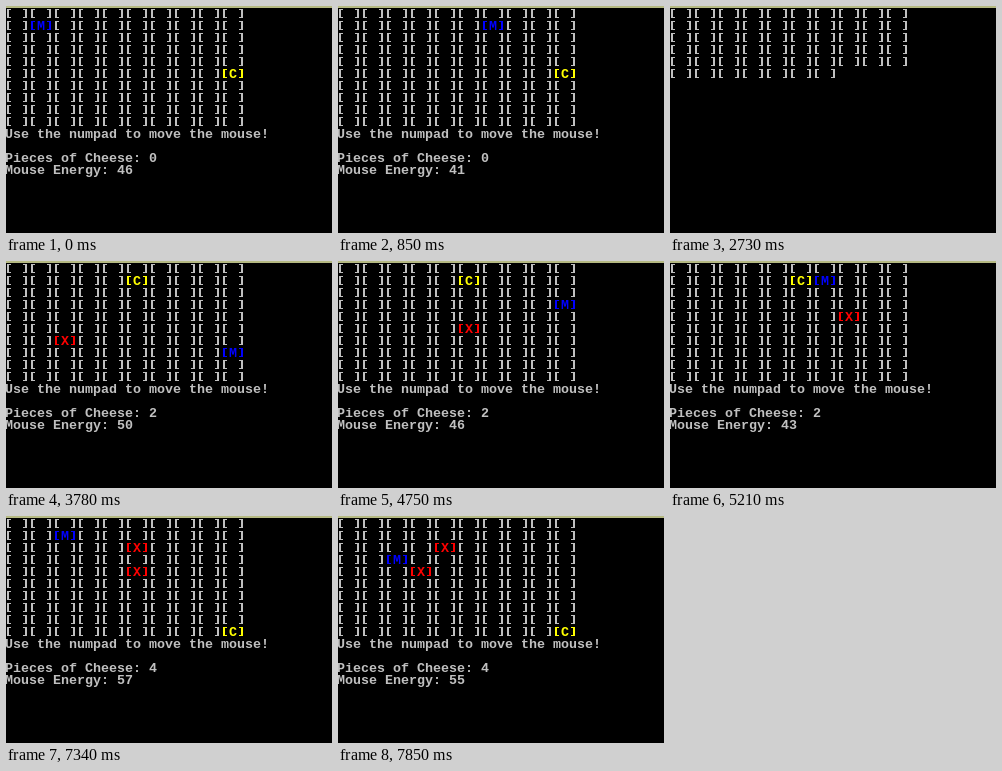
An HTML page with a canvas for the animation above (8 s loop, 326 by 227 pixels).

```html
<!DOCTYPE html>
<html lang="en">
<head>
<meta charset="utf-8">
<title>Mouse and cheese</title>
<style>
  html, body { margin: 0; width: 100%; height: 100%; overflow: hidden; background: #000; }
  canvas { display: block; width: 326px; height: 227px; }
</style>
</head>
<body>
<canvas id="stage" width="326" height="227"></canvas>
<script>
const ctx = document.getElementById('stage').getContext('2d');
const LOOP = 8000, SIZE = 10, CELL_W = 8, CELL_H = 12, LEFT = -1, TOP = 2;
const REDRAW = 30, REDRAW_CELLS = 57;
const GREY = '#c0c0c0', BLUE = '#0000ff', RED = '#ff0000', YELLOW = '#ffff00';

// Row and column step of each key; Q is the up-left diagonal
const STEP = { U: [-1, 0], D: [1, 0], L: [0, -1], R: [0, 1], Q: [-1, -1], '.': [0, 0] };

// Keys and the times they land
const keys = 'RRRRRRRRDDDDLDDRUUUUQQLLULDLLDD';
const times = [
  210, 350, 500, 640, 780, 960, 1130, 1290, 1590, 1870, 2050, 2490, 2760, 3200, 3560, 3780,
  4300, 4430, 4590, 4750, 4880, 5040, 5210, 5350, 5490, 5680, 5890, 6950, 7340, 7620, 7850
];
// Moves whose screen redraw is caught half way
const slow = new Set([960, 1590, 2760, 4880, 5680, 7340, 7850]);

const cheeses = [[5, 9], [7, 9], [1, 5], [0, 4], [9, 9]];
const hunters = [
  { start: [6, 2], path: 'RURRRURRULULLL.' },
  { start: [4, 7], path: 'LL.LL' }
];

const move = ([r, c], key) => [r + STEP[key][0], c + STEP[key][1]];
const same = (a, b) => a[0] === b[0] && a[1] === b[1];

function play() {
  let mouse = [1, 1], energy = 46, eaten = 0, active = [];
  const states = [];
  const save = time => states.push({
    time, mouse, energy, eaten, cheese: cheeses[eaten], foes: active.map(f => f.at)
  });
  save(0);
  times.forEach((time, i) => {
    mouse = move(mouse, keys[i]);
    energy--;
    active = active.map(f => ({ ...f, at: move(f.at, f.path[f.n]), n: f.n + 1 }));
    if (same(mouse, cheeses[eaten])) {
      eaten++;
      energy += 10;
      if (eaten % 2 === 0) {
        const { start, path } = hunters[eaten / 2 - 1];
        active = [...active, { at: start, path, n: 0 }];
      }
    }
    save(time);
  });
  return states;
}
const states = play();

function text(str, col, row) {
  ctx.fillText(str, LEFT + col * CELL_W, TOP + 10 + row * CELL_H);
}

function bracket(col, row, stem) {
  const x = LEFT + col * CELL_W + 2, y = TOP + row * CELL_H + 1;
  ctx.fillRect(x + stem, y, 2, 9);
  ctx.fillRect(x, y, 4, 1);
  ctx.fillRect(x, y + 8, 4, 1);
}

function drawCell(state, row, col) {
  const here = [row, col];
  let mark = '', color = GREY;
  if (same(here, state.mouse)) [mark, color] = ['M', BLUE];
  else if (state.foes.some(f => same(f, here))) [mark, color] = ['X', RED];
  else if (same(here, state.cheese)) [mark, color] = ['C', YELLOW];
  ctx.fillStyle = color;
  bracket(col * 3, row, 0);
  bracket(col * 3 + 2, row, 2);
  if (mark) text(mark, col * 3 + 1, row);
}

function draw(t) {
  let i = states.length - 1;
  while (states[i].time > t) i--;
  const next = states[i + 1];
  const partial = next && slow.has(next.time) && t >= next.time - REDRAW;
  const state = partial ? next : states[i];

  ctx.fillStyle = '#000';
  ctx.fillRect(0, 0, 326, 227);
  ctx.fillStyle = '#b5b982';
  ctx.fillRect(0, 0, 326, 2);
  ctx.font = 'bold 13.333px "Liberation Mono", monospace';

  const count = partial ? REDRAW_CELLS : SIZE * SIZE;
  for (let n = 0; n < count; n++) drawCell(state, Math.floor(n / SIZE), n % SIZE);
  if (partial) return;

  ctx.fillStyle = GREY;
  text('Use the numpad to move the mouse!', 0, 10);
  text('Pieces of Cheese: ' + state.eaten, 0, 12);
  text('Mouse Energy: ' + state.energy, 0, 13);
  if (t >= 6580 && t < 6950) ctx.fillRect(LEFT, 179, CELL_W, 3);
}

function tick() {
  draw(performance.now() % LOOP);
  requestAnimationFrame(tick);
}
tick();
</script>
</body>
</html>
```
